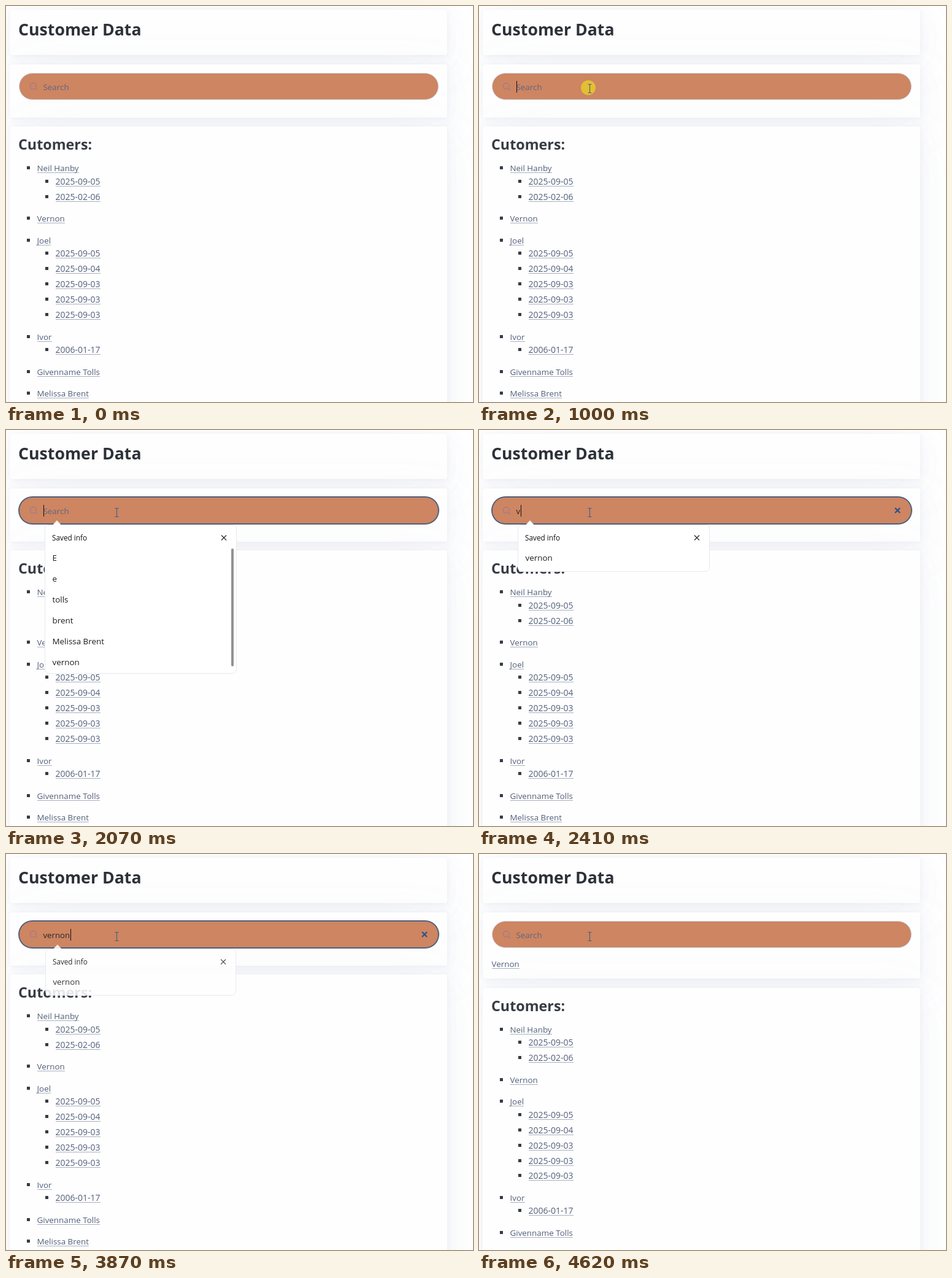
Write an HTML page that moves like this. It is 761 px wide and 645 px high and loops after 8000 ms.

```html
<!DOCTYPE html>
<html lang="en">
<head>
<meta charset="utf-8">
<title>Customer Data</title>
<style>
html, body { margin: 0; width: 100%; height: 100%; overflow: hidden; background: #fff; }
body { font: 13.4px/20px "Open Sans", "Noto Sans", sans-serif; color: #373c44; }
#stage { position: absolute; left: 0; top: 0; width: 761px; height: 645px; overflow: hidden; }
#stage div, #stage span, #stage svg { position: absolute; box-sizing: border-box; white-space: pre; }
.card {
  left: 6px; width: 713px; border-radius: 4px; background: #fefefe;
  box-shadow: 0 .5px 2.6px rgba(129,145,181,.017), .5px 1px 6px rgba(129,145,181,.024),
    1px 2px 11px rgba(129,145,181,.03), 1.7px 3.4px 20px rgba(129,145,181,.036),
    3px 6px 37px rgba(129,145,181,.043), 7.5px 15px 90px rgba(129,145,181,.06),
    0 0 0 1px rgba(129,145,181,.015);
}
#stage .h1 { left: 20px; top: 20px; font-size: 26.7px; line-height: 36px; font-weight: 700; color: #2d3138; }
#stage .h2 { left: 20px; font-size: 23.3px; line-height: 32px; font-weight: 700; }
.link { height: 18px; color: #525f7a; border-bottom: 1px solid #a8afbc; }
.date { font-size: 14px; }
.dot { width: 5px; height: 5px; background: #373c44; }
#field { left: 21px; top: 109px; width: 684px; height: 44px; border-radius: 22px; background: #cd8562; border: 1px solid #cfd5e2; }
#hint { left: 60.5px; top: 122px; color: #5f6680; }
#typed { left: 60.5px; top: 122px; font-size: 13.2px; color: #24262b; }
#caret { top: 122px; width: 1px; height: 19px; background: #111; }
#guess { left: 61px; top: 126px; font-size: 10px; line-height: 14px; color: #111; }
#guess b { font-weight: 400; background: #e4ecfa; display: inline-block; height: 12px; line-height: 13px; }
#tab { left: 96px; top: 128px; width: 16px; height: 11px; border: 1px solid #7b5644; border-radius: 2px; font-size: 7px; line-height: 9px; text-align: center; color: #6d4a3a; }
#popup { left: 63px; top: 154px; width: 313px; height: 243px; transform-origin: 50% 50%; }
#panel { left: 0; top: 0; width: 313px; height: 100%; background: #fff; border: 1px solid #e6e9ee; border-radius: 7px; }
#popup .item { left: 12.5px; color: #1c1d20; }
#popup .label { left: 12px; top: 12px; font-size: 11.8px; line-height: 18px; font-weight: 500; color: #111; }
#bar { left: 304px; top: 39px; width: 4px; height: 192px; border-radius: 2px; background: #929292; }
#glow { left: 166px; top: 121px; width: 24px; height: 24px; border-radius: 50%; background: #e3bf33; }
svg { overflow: visible; left: 0; top: 0; fill: none; }
</style>
</head>
<body>
<div id="stage"></div>
<script>
const stage = document.getElementById('stage');
const LOOP = 8000, TICK = 1000 / 15, SHIFT = 21.6;

function add(tag, props = {}, parent = stage) {
  const el = document.createElement(tag);
  for (const k in props) el[k] = props[k];
  parent.append(el);
  return el;
}
function icon(body, parent = stage) {
  const box = add('div', {}, parent);
  box.innerHTML = `<svg width="1" height="1">${body}</svg>`;
  return box;
}
const px = (el, prop, v) => { el.style[prop] = v + 'px'; };
const show = (el, on) => { el.style.visibility = on ? 'inherit' : 'hidden'; };

// Page: each row is [middle y, text]; dates are nested one level deeper.
const rows = [
  [264.4, 'Neil Hanby'], [285.6, '2025-09-05'], [310.6, '2025-02-06'],
  [346.2, 'Vernon'], [381.7, 'Joel'],
  [403.3, '2025-09-05'], [428.2, '2025-09-04'], [453.1, '2025-09-03'],
  [478, '2025-09-03'], [502.8, '2025-09-03'],
  [538.6, 'Ivor'], [559.8, '2006-01-17'],
  [595.6, 'Givenname Tolls'], [631, 'Melissa Brent']
];
const cards = [0, 1, 2].map(() => add('div', { className: 'card' }));
add('div', { className: 'h1', textContent: 'Customer Data' });
const h2 = add('div', { className: 'h2', textContent: 'Cutomers:' });
const list = rows.map(([y, text]) => {
  const date = /^\d/.test(text), x = date ? 81 : 51;
  const dot = add('div', { className: 'dot' });
  const link = add('span', { className: date ? 'link date' : 'link', textContent: text });
  px(dot, 'left', x - 17);
  px(link, 'left', x - .5);
  return { y, dot, link };
});
const found = add('span', { className: 'link', textContent: 'Vernon' });
px(found, 'left', 20.5);
px(found, 'top', 169);

// Search field
const field = add('div', { id: 'field' });
icon('<g stroke="#a0788a" stroke-width="1.1"><circle cx="44.3" cy="130.3" r="4.9"/><path d="M47.9 133.9L51 137"/></g>');
const glow = add('div', { id: 'glow' });
const hint = add('span', { id: 'hint', textContent: 'Search' });
const typed = add('span', { id: 'typed' });
const guess = add('span', { id: 'guess', innerHTML: 'v<b>ernon</b>' });
const tab = add('div', { id: 'tab', textContent: 'Tab' });
const caret = add('div', { id: 'caret' });
const clear = icon('<path d="M678 127l8 8m0-8l-8 8" stroke="#28508f" stroke-width="2.2"/>');

// Saved entries
const popup = add('div', { id: 'popup' });
add('div', { id: 'panel' }, popup);
icon('<path d="M13 1L20 -6.5L27 1" fill="#fff" stroke="#e6e9ee"/><path d="M13 2L20 -5L27 2z" fill="#fff"/>' +
  '<path d="M288 17.5l8 8m0-8l-8 8" stroke="#24262b" stroke-width="1.2"/>', popup);
add('span', { className: 'label', textContent: 'Saved info' }, popup);
const items = ['E', 'e', 'tolls', 'brent', 'Melissa Brent', 'vernon'].map((textContent, i) => {
  const el = add('span', { className: 'item', textContent }, popup);
  px(el, 'top', 44 + 34 * i);
  return el;
});
const bar = add('div', { id: 'bar' }, popup);

// Pointer
const arrow = icon('<path d="M.5 .5V16.5L4.3 13L6.8 18.6L9.2 17.5L6.8 12H12z" fill="#fff" stroke="#222"/>');
const beam = icon('<path d="M-3 -6.5H-1L0 -5.5L1 -6.5H3M0 -5.5V6.5M-3 7.5H-1L0 6.5L1 7.5H3" stroke="#41617f" stroke-width="1.1"/>');

const P = [[494, 575], [330, 300], [150, 20], [180.5, 134]];
function pathAt(u) {
  const v = 1 - u, w = [v * v * v, 3 * v * v * u, 3 * v * u * u, u * u * u];
  return [0, 1].map(a => P.reduce((s, p, i) => s + p[a] * w[i], 0));
}

function layout(moved) {
  const d = moved ? SHIFT : 0;
  [[6, 74], [95, moved ? 108 : 87], [moved ? 218 : 196, 700]].forEach(([y, h], i) => {
    px(cards[i], 'top', y);
    px(cards[i], 'height', h);
  });
  px(h2, 'top', Math.round(209 + d));
  for (const { y, dot, link } of list) {
    const m = Math.round(y + d);
    px(dot, 'top', m - 3);
    px(link, 'top', m - 10);
  }
  show(found, moved);
}

function draw(t) {
  const within = (a, b) => t >= a && t < b;
  layout(t >= 4540);

  // Focus ring
  const focus = t < 4540 ? Math.min(1, Math.max(0, (t - 1060) / 130)) : t < 4620 ? .5 : 0;
  const mix = (a, b) => Math.round(a + (b - a) * focus);
  const ring = `rgb(${mix(207, 82)},${mix(213, 95)},${mix(226, 122)})`;
  field.style.borderColor = ring;
  field.style.boxShadow = focus ? `0 0 0 ${focus}px ${ring}` : 'none';

  // Text and caret
  show(hint, t < 2340 || t >= 4540);
  show(typed, within(2340, 2540) || within(3870, 4540));
  typed.textContent = t < 2540 ? 'v' : 'vernon';
  show(guess, within(2540, 3870));
  show(tab, within(2540, 3870));
  show(clear, within(2340, 4210));
  show(caret, within(1000, 1530) || within(2070, 2540) || within(3870, 4210));
  px(caret, 'left', t < 2340 ? 61 : t < 2540 ? 68 : 105);

  // Popup
  const short = t >= 2400;
  let alpha = 0;
  if (within(1130, 3870)) alpha = t < 1200 ? .5 : 1;
  else if (within(3870, 4070)) alpha = [.88, .5, .15][Math.min(2, Math.floor((t - 3870) / TICK))];
  popup.style.opacity = alpha;
  popup.style.transform = t >= 3870 ? `scale(${1 - (1 - alpha) * .055})` : 'none';
  px(popup, 'height', short ? 77 : 243);
  items.forEach((el, i) => show(el, short ? i === 5 : true));
  px(items[5], 'top', short ? 44 : 214);
  show(bar, !short);

  // Pointer
  const step = Math.floor((t - 190) / TICK + .01);
  const u = Math.min(1, Math.max(0, step / 11));
  const [x, y] = pathAt(1 - (1 - u) ** 1.6);
  const over = y > 109 && y < 153;
  show(arrow, t >= 190 && !over);
  show(beam, t >= 190 && over);
  for (const el of [arrow, beam]) el.style.transform = `translate(${x}px,${y}px)`;
  show(glow, within(1000, 1200));
  glow.style.opacity = t < 1070 ? 1 : t < 1130 ? .7 : .35;
}

const start = performance.now();
function frame() {
  draw((performance.now() - start) % LOOP);
  requestAnimationFrame(frame);
}
draw(0);
requestAnimationFrame(frame);
</script>
</body>
</html>
```
